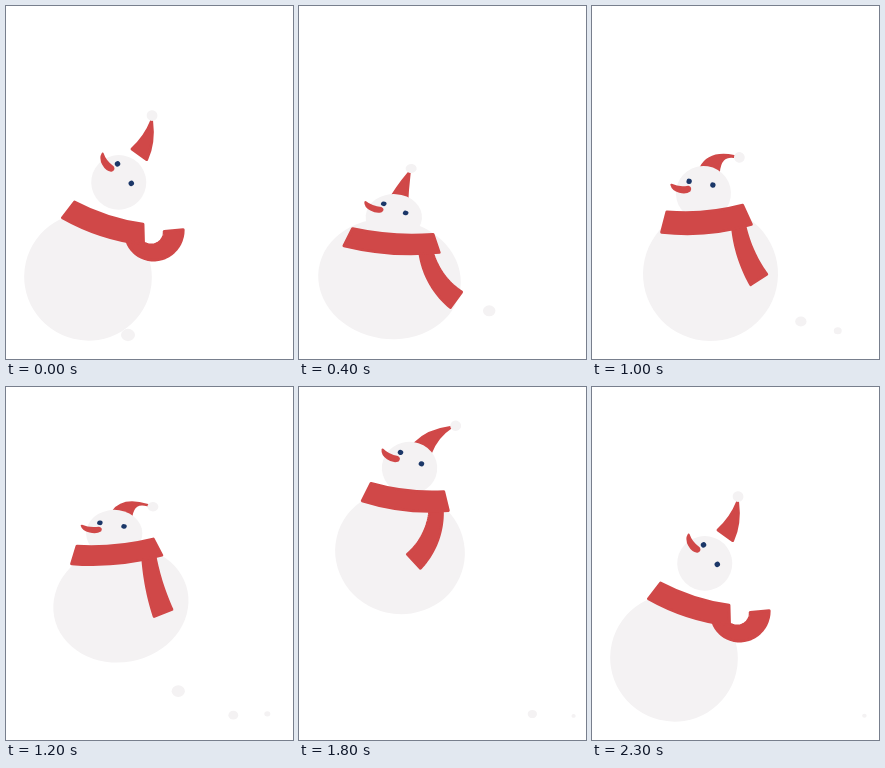
An HTML page that plays this animation: 287 px wide and 353 px high, repeating every 2.6 s.

```html
<!DOCTYPE html>
<html lang="en">
<head>
<meta charset="utf-8">
<title>Bouncing snowman</title>
<style>
  html, body { margin: 0; width: 100%; height: 100%; overflow: hidden; background: #fff; }
  svg { display: block; width: 100%; height: 100%; }
  .snow { fill: #f4f2f3; }
  .eye { fill: #1b3768; }
  .red { fill: #d04848; stroke: #d04848; stroke-width: 3; stroke-linejoin: round; }
  #nose { stroke-width: 2; }
</style>
</head>
<body>
<svg viewBox="0 0 287 353">
  <g class="snow" id="puffs"><ellipse/><ellipse/><ellipse/></g>
  <ellipse class="snow" id="body"/>
  <g id="hat">
    <path class="red" id="cone"/>
    <circle class="snow" id="pom" r="5.4"/>
  </g>
  <g id="head">
    <circle class="snow" r="27.5"/>
    <circle class="eye" cx="-16" cy="-9.7" r="2.7"/>
    <circle class="eye" cx="8" cy="-9.7" r="2.7"/>
    <path class="red" id="nose" d="M-33,-3.5C-30,3.5 -18,4 -14,-.5Q-13,-4 -16,-4.2Q-25,-1 -33,-3.5Z"/>
  </g>
  <path class="red" id="tail"/>
  <path class="red" id="band" d="M-38,-9.5Q0,-3 38,-9.5L45,10Q0,19 -45,10Z"/>
</svg>
<script>
const LOOP = 2600, STEP = 100, LAND = 2300, RAD = Math.PI / 180;
const $ = id => document.getElementById(id);

// Body centre and radii; lean of the spine; distance to neck and head along it;
// turn of the face; turn, lift and bend of the hat; swing of the scarf's loose end
const poses = {
  0:    [82, 271, 64, 63.5, 18, 58, 99.5, 55, 36, 35, -16, 185],
  400:  [90.5, 273, 71.5, 60, 4, 39, 62, 27, 13, 16, 4, 54],
  800:  [105, 284.7, 75, 51, -7, 41, 52, -5, -8, 23, 38, -68],
  1000: [118.5, 268, 67.5, 67, -5, 56, 81, 9, 15, 24, 45, 33],
  1400: [108.5, 172, 69, 49, -4.7, 49.5, 60, 11, 20, 24, 48, -10],
  1800: [101, 165, 65, 62, 6.5, 56, 84.5, 30, 32, 25, 20, -47],
  2000: [89, 156, 64.5, 63, 14, 57, 94, 46, 35, 32, -4, 95]
};
poses[LAND] = poses[0];
const keys = Object.keys(poses).map(Number);

// Smooth curve through the poses
function poseAt(t) {
  const last = keys.length - 1;
  const i = Math.min(last - 1, keys.findLastIndex(k => k <= t));
  const a = poses[keys[i]], b = poses[keys[i + 1]];
  const dt = keys[i + 1] - keys[i], u = (t - keys[i]) / dt;
  const slope = (j, n) => {
    const from = keys[Math.max(0, j - 1)], to = keys[Math.min(last, j + 1)];
    return (poses[to][n] - poses[from][n]) / (to - from);
  };
  return a.map((v, n) =>
    v + (b[n] - v) * u * u * (3 - 2 * u) +
    dt * u * (1 - u) * ((1 - u) * slope(i, n) - u * slope(i + 1, n)));
}

function set(id, attrs) {
  const el = typeof id === 'string' ? $(id) : id;
  for (const name in attrs) el.setAttribute(name, attrs[name]);
}

// Snow crumbs roll off to the right in shrinking bounces
function drawPuffs(t) {
  [0, 420, 950].forEach((birth, i) => {
    const a = (t - birth) / 1400, alive = a >= 0 && a < 1.02;
    const age = Math.min(1, Math.max(0, a));
    const bounce = 40 * (1 - age) ** 1.5 * Math.abs(Math.sin(Math.PI * age / 0.57));
    const r = alive ? 7 - 5 * age ** 1.5 : 0;
    set($('puffs').children[i], { cx: 122 + 154 * age ** 0.65, cy: 329 - bounce, rx: r, ry: r * 0.88 });
  });
}

function drawHat(bend) {
  const len = 40 * (1 - Math.abs(bend) / 150);
  const x = len * Math.sin(bend * RAD), y = -len * Math.cos(bend * RAD);
  const pull = 5.5 / Math.hypot(x, y + 18);
  set('cone', { d: `M-9,0L9,0Q5.5,-18 ${x},${y}Q-5.5,-18 -9,0Z` });
  set('pom', { cx: x + x * pull, cy: y + (y + 18) * pull });
}

// Ribbon bent evenly from hanging to its swing angle, widening on the way
function drawTail(x, y, swing) {
  const steps = 24, left = [], right = [], start = 5 + 0.1 * swing;
  for (let i = 0; i <= steps; i++) {
    const u = i / steps, angle = (start + (swing - start) * u) * RAD;
    const dx = Math.sin(angle), dy = Math.cos(angle), w = 6 + 3.5 * u;
    left.push([x - dy * w, y + dx * w]);
    right.unshift([x + dy * w, y - dx * w]);
    x += dx * 60 / steps;
    y += dy * 60 / steps;
  }
  set('tail', { d: 'M' + left.concat(right).join('L') + 'Z' });
}

function draw(now) {
  const t = Math.min(LAND, Math.floor(now % LOOP / STEP) * STEP);
  const [x, y, rx, ry, lean, neck, reach, face, turn, lift, bend, swing] = poseAt(t);
  const sin = Math.sin(lean * RAD), cos = Math.cos(lean * RAD);
  const onBody = (across, up) => [x + across * cos + up * sin, y + across * sin - up * cos];
  const wide = rx / 67.5, tall = ry / 66, squash = ry / rx;
  const head = `translate(${onBody(0, reach)}) scale(${1.15 - 0.15 * squash} ${squash})`;

  drawPuffs(t);
  set('body', { cx: x, cy: y, rx, ry, transform: `rotate(${2 * lean} ${x} ${y})` });
  set('head', { transform: `${head} rotate(${face})` });
  set('hat', { transform: `${head} rotate(${turn}) translate(0 ${-lift})` });
  set('band', { transform: `translate(${onBody(0, neck)}) rotate(${lean}) scale(${wide} ${tall})` });
  drawHat(bend);
  drawTail(...onBody(32 * wide, neck - 8 * tall), swing);
}

function tick() {
  draw(performance.now());
  requestAnimationFrame(tick);
}
tick();
</script>
</body>
</html>
```
